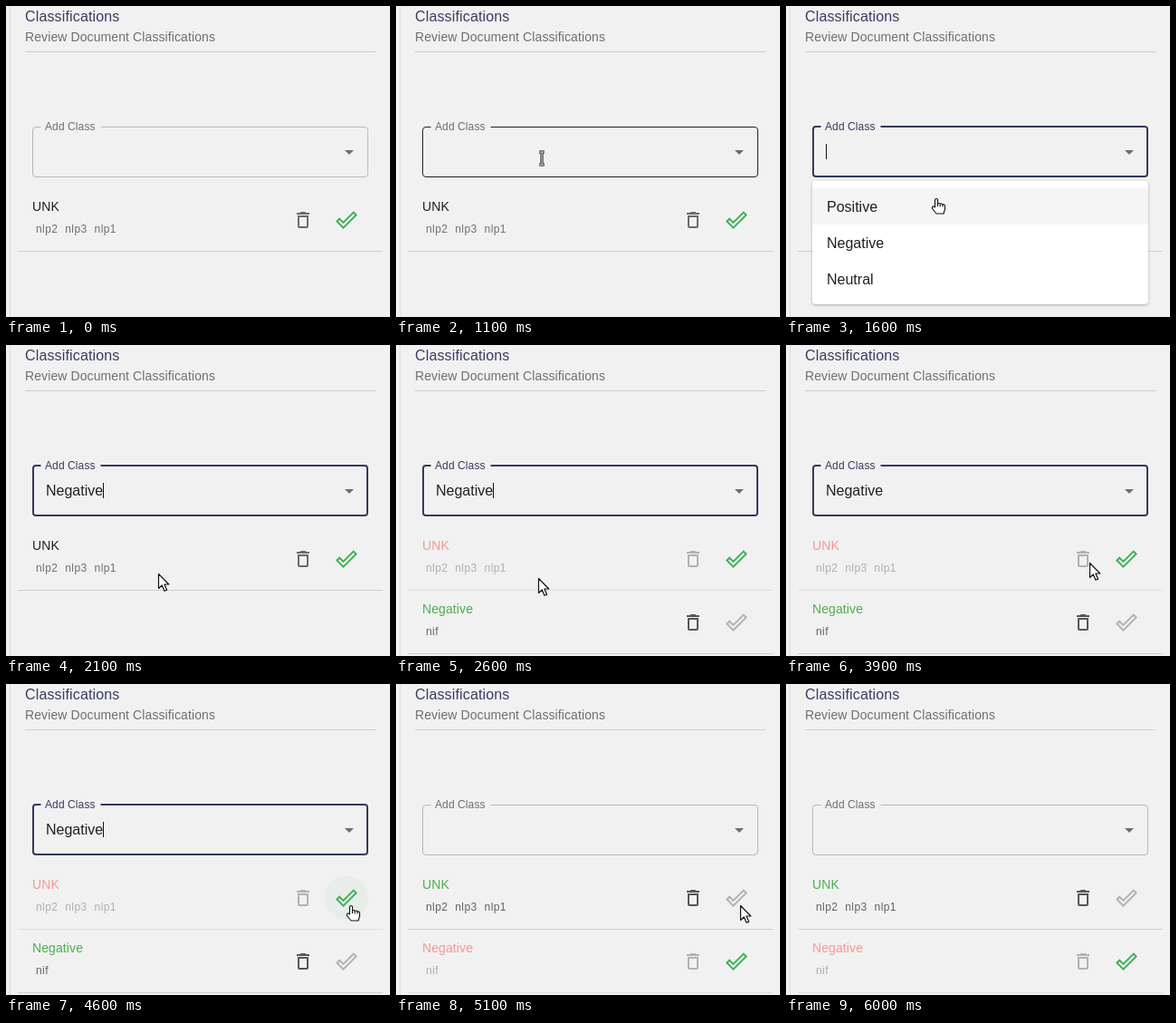
Animation, 424 px wide and 343 px high, one loop 6300 ms. Source, as an HTML page:

```html
<!DOCTYPE html>
<html lang="en">
<head>
<meta charset="utf-8">
<title>Classifications</title>
<style>
  html, body { margin: 0; width: 100%; height: 100%; overflow: hidden; background: #f1f1f1; }
  svg { display: block; width: 424px; height: 343px; }
  text { font: 14px "Liberation Sans", Arial, sans-serif; letter-spacing: .1px; }
  .title { font-size: 16px; letter-spacing: .15px; fill: #393c62; }
  .muted { fill: #6f6f6f; }
  .rule { fill: #cfcfcf; }

  .border { fill: none; stroke: #b9b9b9; }
  .thick { fill: none; stroke: #333a5f; stroke-width: 2; display: none; }
  .label { font-size: 12px; fill: #6f6f6f; }
  .value, .menu text { font-size: 16px; letter-spacing: 0; fill: #202020; }
  .hover .border { stroke: #1f1f1f; }
  .focus .border { display: none; }
  .focus .thick { display: inline; }
  .focus .label { fill: #393c62; }

  .menu .paper { fill: #fff; filter: drop-shadow(0 1px 1.5px rgba(0, 0, 0, .3)); }
  .menu .mark { fill: #000; }

  .name { fill: #202020; }
  .tags text { font-size: 12px; letter-spacing: .4px; fill: #6f6f6f; }
  .trash { fill: #6a6a6a; }
  .check { fill: #42b057; }
  .accepted .name { fill: #4caf50; }
  .accepted .tags text { fill: #626262; }
  .accepted .trash { fill: #565656; }
  .accepted .check, .rejected .trash { fill: #b2b2b2; }
  .rejected .name { fill: #f44336; }
  .rejected .name, .rejected .tags, .rejected .rule { opacity: .5; }
  .halo { fill: #4caf50; opacity: .06; }
</style>
</head>
<body>
<svg viewBox="0 0 424 343">
  <defs>
    <path id="trash" d="M6 19c0 1.1.9 2 2 2h8c1.1 0 2-.9 2-2V7H6v12zM8 9h8v10H8V9zm7.5-5l-1-1h-5l-1 1H5v2h14V4z"/>
    <path id="check" d="M19.77 5.03l1.4 1.4L8.43 19.17l-5.6-5.6 1.4-1.4 4.2 4.2L19.77 5.03m0-2.83L8.43 13.54l-4.2-4.2L0 13.57 8.43 22 24 6.43 19.77 2.2z"/>
  </defs>

  <rect width="424" height="343" fill="#f1f1f1"/>
  <rect x="4" width="1" height="343" fill="#dcdcdc"/>
  <text class="title" x="21" y="17">Classifications</text>
  <text class="muted" x="21" y="39">Review Document Classifications</text>
  <rect class="rule" x="21" y="50" width="387" height="1"/>

  <g id="field">
    <rect class="border" x="29.5" y="133.5" width="370" height="55" rx="3.5"/>
    <rect class="thick" x="30" y="133" width="369" height="55" rx="3"/>
    <rect x="38.5" y="130" width="66" height="6" fill="#f1f1f1"/>
    <text class="label" x="43" y="137">Add Class</text>
    <text class="value" id="value" x="44" y="166">Negative</text>
    <rect id="caret" y="152" width="1" height="17" fill="#111"/>
    <path class="muted" d="M374 159l5 5 5-5z"/>
  </g>

  <g id="row1">
    <text class="name" x="29" y="226">UNK</text>
    <g class="tags">
      <text x="33" y="250">nlp2</text>
      <text x="65.3" y="250">nlp3</text>
      <text x="97.6" y="250">nlp1</text>
    </g>
    <circle class="halo" id="halo" cx="376" cy="236" r="24"/>
    <use class="trash" href="#trash" x="316" y="224"/>
    <use class="check" href="#check" x="364" y="224"/>
    <rect class="rule" x="13" y="270" width="403" height="1"/>
  </g>

  <g id="row2" transform="translate(0 70)">
    <text class="name" x="29" y="226">Negative</text>
    <g class="tags"><text x="33" y="250">nif</text></g>
    <use class="trash" href="#trash" x="316" y="224"/>
    <use class="check" href="#check" x="364" y="224"/>
    <rect class="rule" x="13" y="270" width="403" height="1"/>
  </g>

  <g class="menu" id="menu">
    <rect class="paper" x="29" y="193" width="371" height="136" rx="4"/>
    <rect class="mark" id="mark" x="29" width="371" height="40"/>
    <text x="45" y="227">Positive</text>
    <text x="45" y="267">Negative</text>
    <text x="45" y="307">Neutral</text>
  </g>

  <g id="pointer" stroke-linejoin="round">
    <path id="arrow" d="M.5.5V16.5L4.2 13L7 19.3L9.6 18.2L6.9 12H11.8Z" fill="#fff" stroke="#111" stroke-width="1.2"/>
    <g id="beam" fill="none">
      <path d="M-3 -7H3M-3 7H3M0 -7V7" stroke="#111" stroke-width="3"/>
      <path d="M-3 -7H3M-3 7H3M0 -7V7" stroke="#fff"/>
    </g>
    <g id="hand" stroke="#111" stroke-width="1.1">
      <path d="M-.5 10V1.5Q1 -.5 2.5 1.5V6Q4 4.7 5.2 6.4Q6.8 5.3 8 7Q10.5 6.4 10.5 9V12L9 17H1L-3.5 11.5Q-4 8.5 -1.8 9Z" fill="#fff"/>
      <path d="M2.5 6V9M5.2 6.4V9.4M8 7V9.6" fill="none"/>
    </g>
  </g>
</svg>

<script>
  const LOOP = 6300;
  const $ = id => document.getElementById(id);
  const show = (id, on) => { $(id).style.display = on ? "inline" : "none"; };
  const within = (t, from, to) => t >= from && t < to;

  // Pointer poses: start time, x, y, shape; each holds until the next.
  const poses = [
    [0, 0, 0, ""],
    [700, 214, 101, "arrow"], [800, 182, 150, "arrow"], [900, 167, 178, "arrow"],
    [1100, 161, 168, "beam"],
    [1500, 163, 184, "beam"], [1600, 165, 212, "hand"], [1700, 167, 238, "hand"],
    [1800, 168, 252, "hand"], [2100, 168, 252, "arrow"],
    [2600, 157, 257, "arrow"], [2900, 152, 254, "arrow"],
    [3100, 205, 260, "arrow"], [3200, 275, 246, "arrow"], [3300, 317, 232, "arrow"],
    [3400, 323, 236, "arrow"], [3500, 330, 239, "arrow"], [3600, 335, 240, "arrow"],
    [4100, 347, 242, "arrow"], [4200, 361, 242, "arrow"],
    [4500, 380, 244, "hand"], [5100, 380, 244, "arrow"],
    [5700, 374, 206, "arrow"], [5800, 365, 162, "arrow"], [5900, 357, 123, "arrow"],
    [6000, 0, 0, ""]
  ];

  function drawPointer(t) {
    const [, x, y, shape] = poses.findLast(p => p[0] <= t);
    $("pointer").setAttribute("transform", `translate(${x} ${y})`);
    for (const id of ["arrow", "beam", "hand"]) show(id, id === shape);
  }

  function drawField(t) {
    const focus = within(t, 1300, 4800);
    const hover = within(t, 800, 1300) || within(t, 5800, 5900);
    $("field").setAttribute("class", focus ? "focus" : hover ? "hover" : "");
    show("value", within(t, 2100, 4900));
    const off = within(t, 1800, 2100) || within(t, 2900, 3300) || within(t, 3900, 4500);
    show("caret", focus && !off);
    $("caret").setAttribute("x", t < 2100 ? 44 : 107);
  }

  function drawMenu(t) {
    show("menu", within(t, 1400, 2100));
    show("mark", t >= 1600);
    $("mark").setAttribute("y", t < 1800 ? 201 : 241);
    $("mark").setAttribute("opacity", t < 1900 ? .04 : .1);
  }

  function drawRows(t) {
    $("row1").setAttribute("class", t < 2300 ? "" : t < 4900 ? "rejected" : "accepted");
    $("row2").setAttribute("class", t < 5000 ? "accepted" : "rejected");
    $("row2").setAttribute("opacity", t < 2600 ? .5 : 1);
    show("row2", t >= 2500);
    show("halo", within(t, 4500, 5100));
  }

  const start = performance.now();
  function frame() {
    const t = (performance.now() - start) % LOOP;
    drawField(t);
    drawMenu(t);
    drawRows(t);
    drawPointer(t);
    requestAnimationFrame(frame);
  }
  frame();
</script>
</body>
</html>
```
